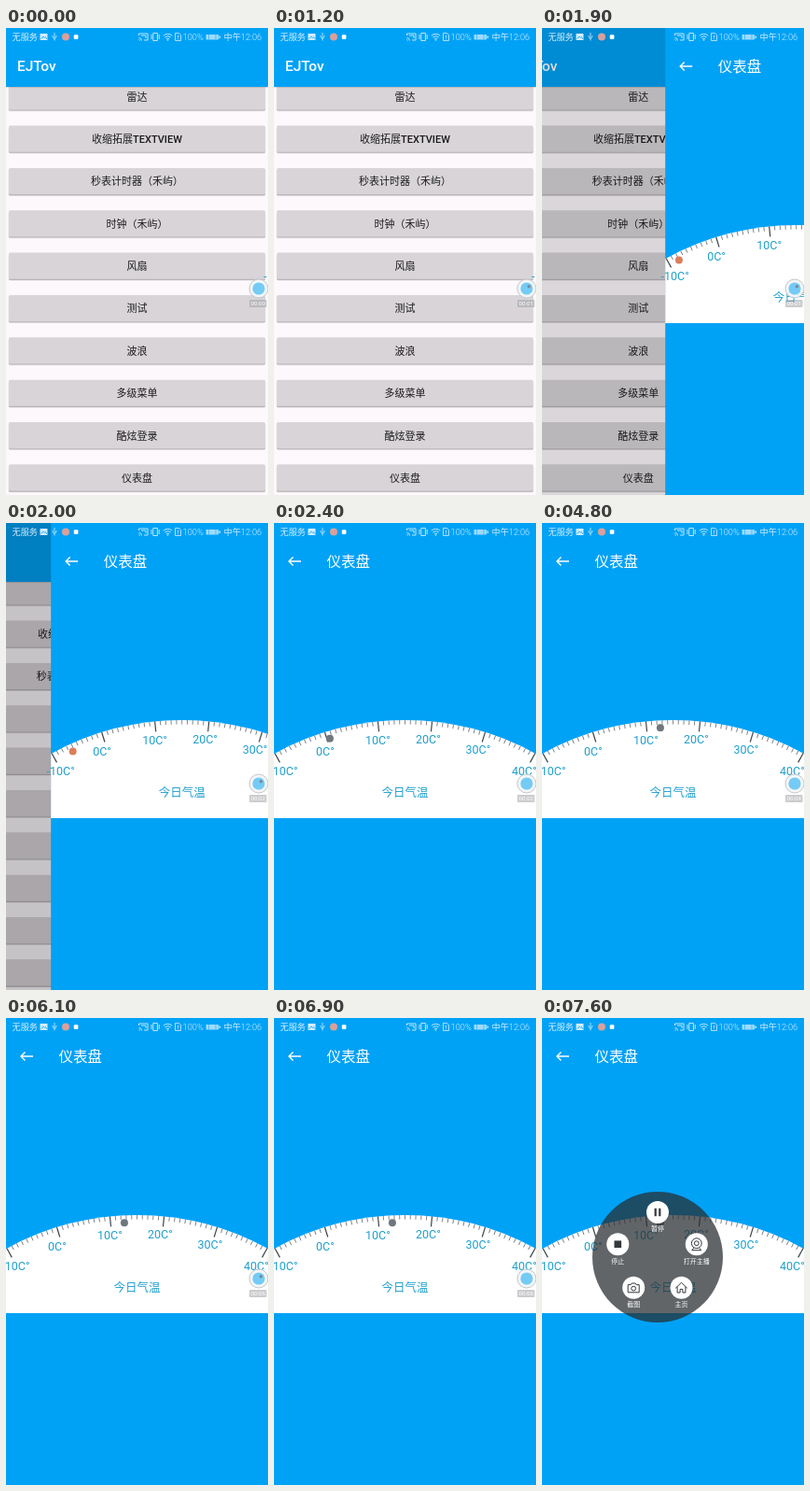
Recreate the animation shown at these times as an HTML page. Size 281 px wide and 500 px high, loop 7.7 s.

```html
<!DOCTYPE html>
<html lang="zh-CN">
<head>
<meta charset="utf-8">
<style>
html, body { margin: 0; width: 100%; height: 100%; overflow: hidden; background: #00a2f6; }
svg { display: block; width: 100vw; height: 100vh; font-family: Roboto, 'Noto Sans CJK SC', 'Noto Sans CJK', sans-serif; }
</style>
</head>
<body>
<svg id="stage" viewBox="0 0 281 500" preserveAspectRatio="none"></svg>
<script>
const LOOP = 7700, STEP = 100, W = 281;
const BLUE = '#00a2f6', TEAL = '#1f9fcd';
const CX = 140.5, CY = 501, R = 290;
const stage = document.getElementById('stage');

const rect = (x, y, w, h, fill, more = '') =>
  `<rect x="${x}" y="${y}" width="${w}" height="${h}" fill="${fill}" ${more}/>`;
const circle = (x, y, r, fill, more = '') =>
  `<circle cx="${x}" cy="${y}" r="${r}" fill="${fill}" ${more}/>`;
const text = (x, y, size, fill, str, more = '') =>
  `<text x="${x}" y="${y}" font-size="${size}" fill="${fill}" ${more}>${str}</text>`;
const line = (d, stroke, width, more = '') =>
  `<path d="${d}" fill="none" stroke="${stroke}" stroke-width="${width}" ${more}/>`;
const middle = 'text-anchor="middle"';

function listPage() {
  const items = ['雷达', '收缩拓展TEXTVIEW', '秒表计时器（禾屿）', '时钟（禾屿）', '风扇',
    '测试', '波浪', '多级菜单', '酷炫登录', '仪表盘'];
  const buttons = items.map((name, i) => {
    const y = 73.6 + 45.35 * i;
    return rect(2.6, y - 13, 275.8, 28.6, '#000', 'rx="2" opacity=".1"') +
      rect(3, y - 13.5, 275, 28.4, '#b9b5b9', 'rx="1.5"') +
      rect(3, y - 14.4, 275, 28.2, '#d8d4d8', 'rx="1.5"') +
      text(CX, y + 4.1, 11, '#1c1c1c', name, middle + ' font-weight="500"');
  }).join('');
  return rect(0, 0, W, 500, '#fcf8fc') + buttons +
    rect(0, 63, W, 1, '#000', 'opacity=".12"') + rect(0, 0, W, 63, BLUE) +
    text(12, 46.3, 15.5, '#fff', 'EJTov', 'font-weight="500"');
}

// Dial angle in degrees for a temperature
const angle = v => (v - 15) * 1.15;

function dialPage() {
  let ticks = '';
  for (let v = -10; v <= 40; v++) {
    const major = v % 10 === 0;
    ticks += line(`M${CX} ${CY - R}v${major ? 11 : 4.6}`, major ? '#3c444a' : '#666e74',
      major ? 1.2 : 0.8, `transform="rotate(${angle(v)} ${CX} ${CY})"`);
  }
  const labels = [[-4.7, 269.5], [45, 248.5], [98, 236.6], [152, 235.6], [205.5, 247], [255, 269.5]]
    .map(([x, y], i) => text(x, y, 12.5, TEAL, (i - 1) * 10 + 'C°')).join('');
  return rect(0, 0, W, 500, BLUE) +
    `<path d="M0 316V247.2A${R} ${R} 0 0 1 ${W} 247.2V316Z" fill="#fff"/>` + ticks + labels +
    text(CX, 293.4, 12.5, TEAL, '今日气温', middle) +
    line('M29 41H16M20.5 36.5L16 41L20.5 45.5', '#fff', 1.4) +
    text(56.5, 46.5, 15.5, '#fff', '仪表盘') +
    circle(0, 0, 4, '#70777e', 'id="dot"');
}

function statusBar() {
  const c = '#d3edfc';
  return text(6.5, 13, 9.2, c, '无服务', 'font-weight="300"') +
    rect(36.5, 6, 8, 7, c, 'rx=".6"') + line('M37.5 11.8L40 9L41.5 10.5L42.5 9.5L43.8 11.8', BLUE, 0.8) +
    line('M52 5V13.5M50 8V9.6L52 11.4L54 9.6V8', c, 0.8) +
    circle(64, 9.5, 4, '#d9a09c') +
    rect(72.8, 7.2, 4.6, 4.8, '#fff', 'rx="1"') +
    line('M142.5 8V6H152V13H148M142.5 12.5a1 1 0 0 1 1 1M142.5 10.5a3 3 0 0 1 3 3M145 8H150V11', c, 0.9) +
    line('M157.8 5.5H162.4V13.5H157.8ZM156 7V12M164.2 7V12', c, 0.9) +
    line('M168.8 8.2a7 7 0 0 1 9.4 0M170.4 10a4.6 4.6 0 0 1 6.2 0M172 11.8a2.2 2.2 0 0 1 3 0', c, 0.9) +
    circle(173.5, 13, 0.8, c) +
    line('M181.5 5.5H185.5L187.5 7.5V13.5H181.5ZM184.5 7.8V10.6M184.5 11.5V12.4', c, 0.8) +
    text(189.6, 13, 9.2, c, '100%', 'font-weight="300"') +
    rect(214.5, 7, 13.5, 5.4, c, 'rx=".6" opacity=".75"') + rect(228.5, 8.5, 1.4, 2.4, c) +
    line('M217.5 7V12.4M225 7V12.4', BLUE, 0.5) +
    text(233.5, 13, 9.2, c, '中午12:06', 'font-weight="300"');
}

function ball() {
  return circle(271, 279, 10, '#f2f5f7', 'stroke="#c3c8cc" stroke-width="1" fill-opacity=".92"') +
    circle(271, 279, 6.6, '#74cbf5') +
    circle(273.4, 276.8, 1.7, '#7d8796', 'id="mark"') +
    rect(261, 291, 18.5, 8, '#a3a3a8', 'rx="1" opacity=".55"') +
    text(270.3, 297.4, 6.2, '#fff', '', middle + ' id="clock"');
}

function menu() {
  const ink = '#33383c';
  const button = (x, y, name, icon) =>
    `<g transform="translate(${x} ${y})">${circle(0, 0, 12, '#fff')}${icon}` +
    text(0, 20.4, 7, '#fff', name, middle) + '</g>';
  return circle(0, 0, 70, '#292c30', 'opacity=".73"') +
    button(0, -48, '暂停', rect(-3.4, -4.2, 2.2, 8.4, ink) + rect(1.2, -4.2, 2.2, 8.4, ink)) +
    button(-42.7, -13.8, '停止', rect(-3.8, -3.8, 7.6, 7.6, ink)) +
    button(41.8, -13.8, '打开主播', circle(0, -1, 5.4, 'none', `stroke="${ink}"`) +
      circle(0, -1, 2.4, 'none', `stroke="${ink}"`) + line('M-3 4L-5 6.5H5L3 4', ink, 1)) +
    button(-25.8, 32.8, '截图', line('M-6 -3.2H-3L-2 -4.8H2L3 -3.2H6V5H-6Z', ink, 1) +
      circle(0, 0.8, 2.4, 'none', `stroke="${ink}"`)) +
    button(25.5, 32.8, '主页', line('M-6.3 0.5L0 -5.5L6.3 0.5M-4.4 -1V5.2H-1.4V1.6H1.4V5.2H4.4V-1', ink, 1));
}

stage.innerHTML =
  `<g id="list">${listPage()}</g>` + rect(0, 0, W, 500, '#000', 'id="shade"') +
  `<g id="dial">${dialPage()}</g>` + statusBar() +
  `<g id="ball">${ball()}</g><g id="menu">${menu()}</g>`;

const part = {};
for (const id of ['list', 'shade', 'dial', 'dot', 'ball', 'mark', 'clock', 'menu'])
  part[id] = document.getElementById(id);
const set = (id, name, value) => part[id].setAttribute(name, value);
const show = (id, on) => set(id, 'visibility', on ? 'visible' : 'hidden');
const clamp = x => Math.max(0, Math.min(1, x));
const mix = (a, b, k) => a + (b - a) * k;

function draw(t) {
  // Page slide
  const x = W * (1 - clamp((t - 1800) / 450)) ** 3;
  const open = 1 - x / W;
  set('dial', 'transform', `translate(${x} 0)`);
  set('list', 'transform', `translate(${-0.25 * W * open} 0)`);
  set('shade', 'opacity', 0.26 * open);

  // Temperature pointer
  const v = Math.min(12.6, -10 + Math.max(0, t - 1786) * 0.0172);
  const a = angle(v) * Math.PI / 180;
  set('dot', 'cx', CX + 282 * Math.sin(a));
  set('dot', 'cy', CY - 282 * Math.cos(a));
  const k = clamp((t - 2000) / 300);
  set('dot', 'fill', `rgb(${mix(220, 112, k)},${mix(126, 119, k)},${mix(92, 126, k)})`);

  // Recorder ball and its menu
  const grow = clamp((t - 7300) / 300);
  show('ball', grow === 0);
  show('mark', grow === 0 && t >= 1100 && (t + 900) % 2000 <= 1000);
  part.clock.textContent = '00:0' + Math.floor(t / 1000);
  show('menu', grow > 0);
  set('menu', 'transform', `translate(${mix(271, 124, grow)} ${mix(279, 256, grow)}) scale(${mix(0.14, 1, grow)})`);
}

const start = performance.now();
function tick() {
  const t = (performance.now() - start) % LOOP;
  draw(Math.floor(t / STEP) * STEP);
  requestAnimationFrame(tick);
}
tick();
</script>
</body>
</html>
```
